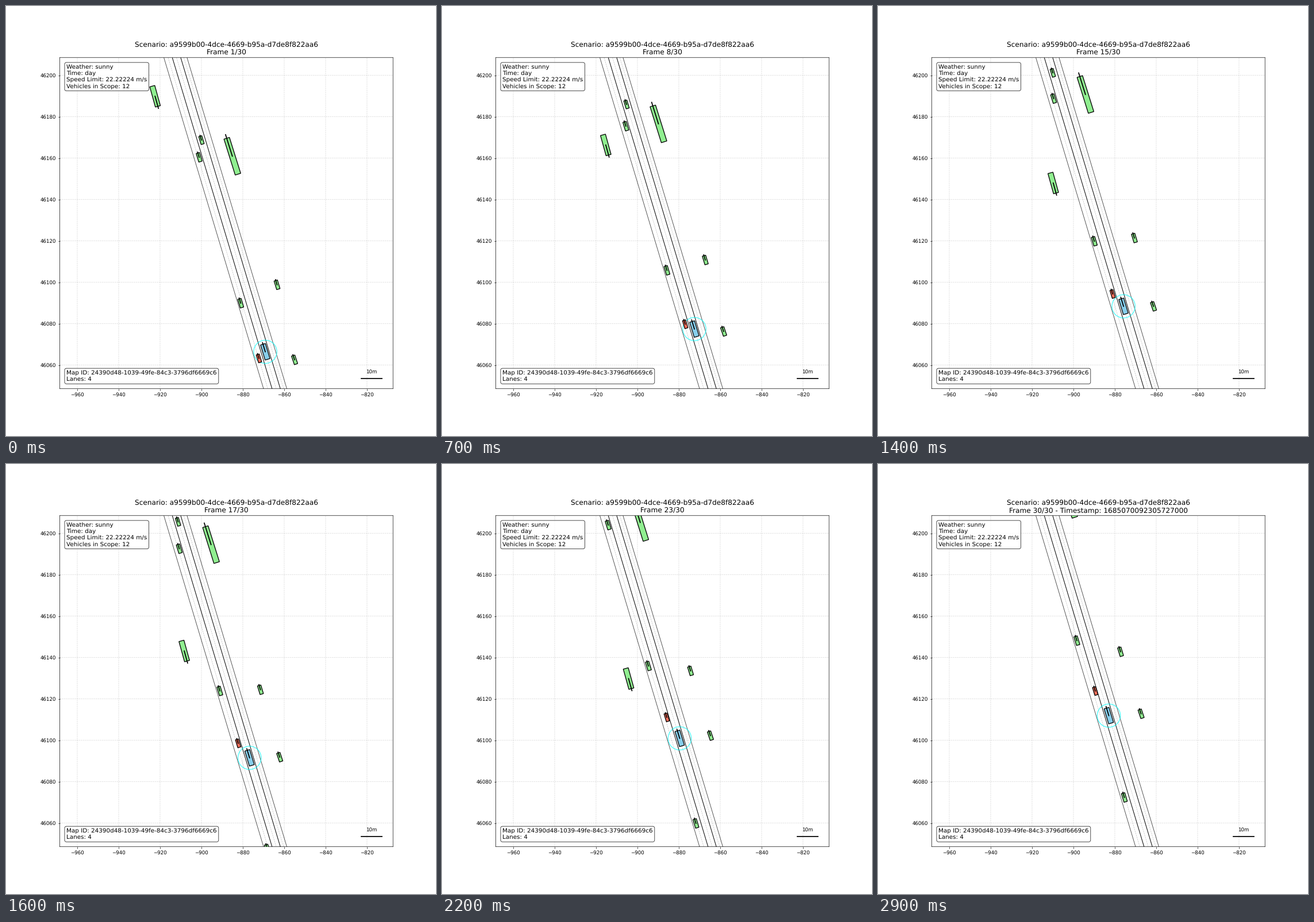
Recreate the animation shown at these times as a matplotlib script. Size 748 by 748 pixels, loop 3000 ms.

```python
import numpy as np
import matplotlib.pyplot as plt
from matplotlib.animation import FuncAnimation
from matplotlib.patches import Circle, Polygon

SIZE = 748
FRAMES = 30
LEFT, TOP, BOTTOM = 0.125 * SIZE, 0.12 * SIZE, 0.89 * SIZE
SCALE = 0.77 * SIZE / 160          # pixels per metre
X_MIN, Y_MIN = -968.47, 46048.55
Y_MAX = Y_MIN + 160
HEADING = 16.8                     # road direction, degrees left of up

plt.rcParams["font.family"] = "DejaVu Sans"
plt.rcParams["text.hinting"] = "none"
fig, ax = plt.subplots(figsize=(12, 12), dpi=SIZE / 12)
fig.subplots_adjust(left=0.125, right=0.9, bottom=0.11, top=0.88)
ax.set_xlim(X_MIN, X_MIN + 0.775 * SIZE / SCALE)
ax.set_ylim(Y_MIN, Y_MAX)
ax.ticklabel_format(useOffset=False, style="plain")
ax.grid(True, linestyle="--", alpha=0.5)
for line in [*ax.spines.values(), *ax.get_xgridlines(), *ax.get_ygridlines()]:
    line.set_snap(False)


def to_map(px, py):
    """Stage pixels (y down) to map metres."""
    return X_MIN + (px - LEFT) / SCALE, Y_MAX - (py - TOP) / SCALE


def stage_line(p, q, **style):
    (x0, y0), (x1, y1) = to_map(*p), to_map(*q)
    return ax.plot([x0, x1], [y0, y1], **style)[0]


def sensed_time(step):
    """Traffic readings run about one step ahead mid-way, then fall back."""
    ahead = np.clip((step - 4) / 3, 0, 1) - np.clip((step - 22) / 7, 0, 1)
    return step + 0.9 * ahead


class Vehicle:
    def __init__(self, size, start, velocity, color="lightgreen",
                 angle=HEADING, brake=0, clock=sensed_time, last=FRAMES):
        self.length, self.width = size
        a = np.radians(angle)
        self.ahead = np.array([-np.sin(a), -np.cos(a)])
        self.side = np.array([np.cos(a), -np.sin(a)])
        self.start, self.velocity = np.array(start), np.array(velocity)
        self.brake, self.clock, self.last = brake, clock, last
        self.body = ax.add_patch(Polygon(np.zeros((4, 2)), facecolor=color,
                                         edgecolor="black", lw=1.5, zorder=4))
        self.nose, = ax.plot([], [], color="black", lw=2, zorder=5)

    def center(self, step):
        t = self.clock(step)
        return self.start + self.velocity * t * (1 - self.brake * t)

    def move(self, step):
        c = self.center(step)
        f = self.ahead * self.length / 2
        s = self.side * self.width / 2
        corners = [c + f + s, c + f - s, c - f - s, c - f + s]
        self.body.set_xy([to_map(*p) for p in corners])
        self.nose.set_data(*zip(to_map(*c), to_map(*(c + 1.2 * f))))
        for part in (self.body, self.nose):
            part.set_visible(step < self.last)


# Road: neighbouring lanes both draw their shared edge
edges = [(274.6, 448), (289.3, 462.8), (303.9, 477.2), (314.9, 488.5)]
for a, b in zip(edges, edges[1:]):
    mid = np.mean([a, b], axis=0)
    stage_line((mid[0], TOP), (mid[1], BOTTOM), color="gray", ls="--",
               lw=0.8, alpha=0.5)
    for top, bottom in (a, b):
        stage_line((top, TOP), (bottom, BOTTOM), color="black", lw=1,
                   alpha=0.75)

CAR, SMALL = (15.7, 6.1), (14.4, 5.6)
ego = Vehicle((27.4, 8.9), (451, 601.5), (-1.707, -5.648), "skyblue",
              clock=float)
truck = Vehicle((65.5, 10), (393.7, 261.3), (-2.57, -8.4), angle=17.4,
                brake=0.0062, clock=float)
bus = Vehicle((36.5, 9), (259.3, 157), (3.44, 11.4), angle=195.5,
              brake=0.0075, last=26)
rival = Vehicle(SMALL, (440, 613), (-2.14, -7.52), "#fc705c")
traffic = [
    Vehicle(CAR, (336, 263.2), (-2.05, -6.85)),
    Vehicle(SMALL, (340, 233.3), (-2.41, -7.85)),
    Vehicle(CAR, (408.3, 517), (-2.15, -7.23)),
    Vehicle(CAR, (491.2, 794.7), (-2.16, -7.4)),
    Vehicle(CAR, (471.5, 485), (-1.71, -5.46)),
    Vehicle(CAR, (502, 615.5), (-1.53, -6.24), angle=18.5),
]
vehicles = [ego, truck, bus, rival, *traffic]
ring = ax.add_patch(Circle((0, 0), 20.2 / SCALE, fill=False, edgecolor="cyan",
                           lw=1.5, alpha=0.7, zorder=3))

# Scale bar and info boxes
stage_line((617.6, 648), (653.6, 648), color="black", lw=2)
ax.text(*to_map(635.6, 639), "10m", ha="center", va="baseline", fontsize=10)
info = dict(transform=ax.transAxes, fontsize=12, zorder=8,
            bbox=dict(boxstyle="round", facecolor="white", alpha=0.8))
ax.text(0.02, 0.98, "Weather: sunny\nTime: day\n"
        "Speed Limit: 22.22224 m/s\nVehicles in Scope: 12", va="top", **info)
ax.text(0.02, 0.02, "Map ID: 24390d48-1039-49fe-84c3-3796df6669c6\nLanes: 4",
        va="bottom", **info)
title = ax.set_title("", fontsize=14)


def update(step):
    for v in vehicles:
        v.move(step)
    ring.center = to_map(*ego.center(step))
    label = f"Frame {step + 1}/{FRAMES}"
    if step == FRAMES - 1:
        label += " - Timestamp: 1685070092305727000"
    title.set_text("Scenario: a9599b00-4dce-4669-b95a-d7de8f822aa6\n" + label)


anim = FuncAnimation(fig, update, frames=FRAMES, interval=100, repeat=True,
                     repeat_delay=0, blit=False)
plt.show()
```
